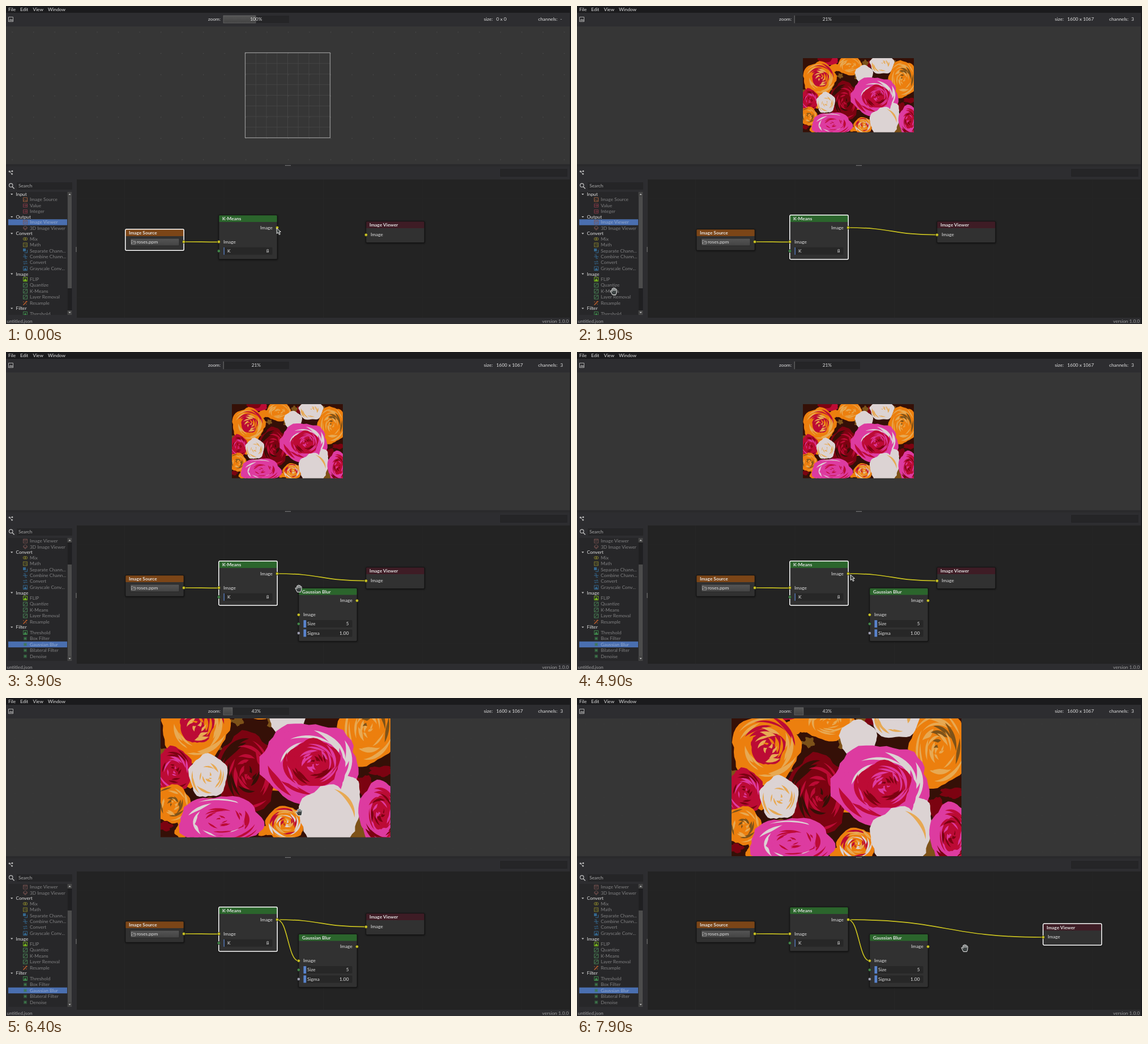
These frames come from a looping animation (998 by 561 pixels, 8000 ms). An HTML page:

```html
<!DOCTYPE html>
<html lang="en">
<head>
<meta charset="utf-8">
<title>Node editor</title>
<style>
html, body { margin: 0; width: 100%; height: 100%; overflow: hidden; background: #2d2d30; }
svg { display: block; width: 998px; height: 561px; font: 8.32px Lato, sans-serif; }
text { fill: #e2e2e2; white-space: pre; }
.bold { font-weight: 700; }
.dim { fill: #fff; fill-opacity: .42; }
</style>
</head>
<body>
<svg id="stage" viewBox="0 0 998 561"></svg>
<script>
const LOOP = 8000, STEP = 100;
const YELLOW = '#c9c224', GREEN = '#2b652c';
const $ = id => document.getElementById(id);

const rect = (x, y, w, h, fill, more = '') =>
  `<rect x="${x}" y="${y}" width="${w}" height="${h}" fill="${fill}" ${more}/>`;
const line = (d, stroke, width = 1, more = '') =>
  `<path d="${d}" fill="none" stroke="${stroke}" stroke-width="${width}" ${more}/>`;
const label = (x, y, str, cls = '', anchor = 'start', id = '') =>
  `<text x="${x}" y="${y + 2.9}" class="${cls}" text-anchor="${anchor}" id="${id}">${str}</text>`;
const dot = (x, y, r, fill, more = '') => `<circle cx="${x}" cy="${y}" r="${r}" fill="${fill}" ${more}/>`;

// ---------- flower picture, 406 x 271 units ----------
let seed = 11;
const rand = () => (seed = (seed * 16807) % 2147483647) / 2147483647;
const polygon = (pts, fill) =>
  `<path d="M${pts.map(p => p.map(v => v.toFixed(1)).join(' ')).join('L')}Z" fill="${fill}"/>`;

function blob(x, y, rx, ry, fill, wobble = .16) {
  const phase = rand() * 6, pts = [];
  for (let i = 0; i < 44; i++) {
    const a = i / 44 * Math.PI * 2;
    const r = 1 + wobble * (.35 * Math.sin(5 * a + phase) + .4 * (rand() - .5));
    pts.push([x + rx * r * Math.cos(a), y + ry * r * Math.sin(a)]);
  }
  return polygon(pts, fill);
}

function petal(x, y, rx, ry, r, start, span, thick, fill) {
  const outer = [], inner = [];
  for (let i = 0; i <= 12; i++) {
    const u = i / 12, a = start + span * u;
    const put = (list, k) => list.push([x + rx * k * Math.cos(a), y + ry * k * Math.sin(a)]);
    put(outer, r - .07 * u);
    put(inner, r - .07 * u - thick * Math.sin(Math.PI * u));
  }
  return polygon(outer.concat(inner.reverse()), fill);
}

function rose(x, y, rx, ry, base, tones, core) {
  let out = blob(x, y, rx, ry, base);
  if (core) out += blob(x + rx * .06, y, rx * .5, ry * .52, core);
  for (let r = .92, k = 0; r > .1; r -= .105, k++)
    for (let j = 0; j < 4; j++)
      out += petal(x + rx * .06 * (1 - r), y, rx, ry, r, j * 1.57 + k * .9 + rand(), .8 + rand() * .8,
        .06 + rand() * .09, tones[(j + k) % tones.length]);
  return out;
}

function flowers() {
  const dark = '#351007', wine = '#7c0311', red = '#bc0b35', pink = '#dd3ba0',
    orange = '#ec7f0e', sand = '#e7a953', olive = '#7d5219', white = '#dcd3d3';
  let out = rect(0, 0, 406, 271, dark);
  for (let i = 0; i < 46; i++)
    out += blob(rand() * 406, rand() * 271, 9 + rand() * 15, 7 + rand() * 13, [olive, dark, wine, olive, orange][i % 5], .5);
  out += blob(95, 8, 34, 18, red) + blob(80, 4, 26, 12, wine);
  out += rose(172, 28, 46, 34, orange, [sand, orange, sand]);
  out += blob(224, 58, 33, 32, white) + rose(290, 22, 44, 36, white, [white, sand, white, white]);
  out += rose(364, 76, 50, 68, orange, [sand, orange, sand, sand, olive]);
  out += rose(61, 74, 60, 60, orange, [sand, orange, sand, red], red);
  out += rose(22, 152, 34, 40, red, [wine, pink, red]);
  out += rose(152, 158, 54, 72, wine, [red, wine, dark, red]);
  out += rose(84, 163, 34, 38, white, [white, sand, white]);
  out += rose(20, 212, 32, 34, orange, [sand, orange, olive]);
  out += rose(220, 246, 34, 30, orange, [sand, white, red]);
  out += rose(262, 139, 86, 70, pink, [pink, red, pink, white, pink], red);
  out += rose(270, 140, 46, 42, red, [pink, wine, red, pink]);
  out += blob(298, 232, 54, 52, white) + blob(335, 195, 18, 32, white);
  out += petal(298, 232, 54, 52, .9, -1.4, 1.5, .12, sand);
  out += rose(106, 243, 74, 45, pink, [red, pink, white, pink], red);
  out += rose(104, 240, 42, 26, pink, [red, pink, pink]);
  out += rose(388, 228, 38, 56, pink, [red, wine, pink], red);
  return out;
}

// ---------- sidebar ----------
const icons = {
  pic: c => line('M30.5-3.5h7v7h-7zM31 2l2-2 2 2 1-1 1 1', c, .8),
  num: c => line('M30.5-3h7v6h-7zM32-1v2M34-1h1v2h-1zM36.5-1v2', c, .8),
  view: c => line('M30.5-3.5h7v7h-7zM30.5-1.8h7M32 1.5l1.5-2 2 2', c, .8),
  cube: c => line('M34-4l3 2v3l-3 2-3-2v-3zM30-1l4 2 4-2M34 1v3', c, .8),
  mix: c => dot(32.6, 0, 2.3, 'none', `stroke="${c}" stroke-width=".9"`) + dot(35.4, 0, 2.3, 'none', `stroke="${c}" stroke-width=".9"`),
  math: c => line('M30.5-3.5h7v7h-7zM32-1.5h1.8M34.8 1.5h1.8M35.5-2v2M32 2l2-2', c, .8),
  split: c => rect(30, -4, 5, 5, c) + line('M32.5 3.5h5v-5', c, 1),
  merge: c => line('M34-4v8M30 0h8M31-3h2M35 3h2', c, 1),
  swap: c => line('M30-1.5h7l-2-2M38 1.5h-7l2 2', c, .9),
  half: c => line('M30.5-3.5h7v7h-7z', c, .9) + polygon([[31, 3], [34, -2], [37, 3]], c),
  curve: c => line('M30.5-3.5h7v7h-7zM32 2.5q0-3 4.5-4.5', c, .9),
  wand: c => line('M30.5 3.5l5-5', c, 1.4) + line('M36-4v3M34.5-2.5h3.5M31-3v2M36 1v2', c, .8),
  blur: c => rect(31, -3, 6, 6, c, 'opacity=".45"') + dot(34, 0, 1.7, c)
};
const tree = [
  ['Input', ['Image Source', 'pic', '#b4683f'], ['Value', 'num', '#8f3b4b'], ['Integer', 'num', '#8f3b4b']],
  ['Output', ['Image Viewer', 'view', '#7c5552'], ['3D Image Viewer', 'cube', '#7c5552']],
  ['Convert', ['Mix', 'mix', '#8f8a2c'], ['Math', 'math', '#8f8a2c'], ['Separate Chann...', 'split', '#35688f'],
    ['Combine Chann...', 'merge', '#35688f'], ['Convert', 'swap', '#35688f'], ['Grayscale Conv...', 'half', '#35688f']],
  ['Image', ['FLIP', 'half', '#76b51c'], ['Quantize', 'curve', '#4c8a58'], ['K-Means', 'curve', '#4c8a58'],
    ['Layer Removal', 'curve', '#4c8a58'], ['Resample', 'wand', '#c8622c']],
  ['Filter', ['Threshold', 'half', '#3f8a4c'], ['Box Filter', 'blur', '#3f7a4c'], ['Gaussian Blur', 'blur', '#3f7a4c'],
    ['Bilateral Filter', 'blur', '#3f7a4c'], ['Denoise', 'blur', '#3f7a4c']]
];
const rowY = {};
function treeRows() {
  let y = 332, out = '';
  for (const [title, ...items] of tree) {
    out += polygon([[8, y - 1], [12.4, y - 1], [10.2, y + 1.4]], '#c8c8c8') + label(17.5, y, title);
    y += 9.6;
    for (const [name, icon, color] of items) {
      rowY[name] = y;
      out += `<g transform="translate(0 ${y})">${icons[icon](color)}</g>` + label(42, y - .2, name, 'dim');
      y += 10.45;
    }
    y -= 1.05;
  }
  return out;
}

// ---------- nodes ----------
const pin = (x, y, color = YELLOW) => dot(x, y, 2.7, color, 'stroke="#1c1c1c" stroke-width=".7"');
function node(x, y, h, title, color, selected, body) {
  return `<g transform="translate(${x} ${y})">` +
    rect(-.5, 0, 104.5, h + 1.5, '#000', 'rx="2" opacity=".55" filter="url(#shadow)"') +
    rect(0, 0, 103, h, '#313131', 'rx="1.5"') + rect(0, 0, 103, 12, color, 'rx="1.5"') +
    rect(-.2, -.2, 103.4, h + .4, 'none', `rx="2" stroke="${selected ? '#fff' : '#141414'}" stroke-width="${selected ? 1.5 : .9}"`) +
    label(6, 6.4, title, 'bold') + body + '</g>';
}
const slider = (y, name, value, fill, pinColor) =>
  rect(8.5, y - 6.5, 86, 13, '#272727', 'rx="1"') + rect(8.5, y - 6.5, fill, 13, '#5a84cc') +
  label(15, y - .2, name) + label(88.5, y - .2, value, '', 'end') + pin(0, y, pinColor);
const filterPorts = label(95, 22, 'Image', '', 'end') + pin(103, 22) + label(8, 46.7, 'Image') + pin(0, 47);

const sourceBody = rect(8.5, 16, 86.5, 13, 'url(#button)', 'rx="1" stroke="#222" stroke-width=".7"') +
  line('M10.5 19.5h2.5l1 1.3h3.5v5h-7zM10.5 25.5l1.6-3h6l-1.2 3', '#a8a8a8', .8) + label(20, 22.2, 'roses.ppm') + pin(103, 22);
const kmeansBody = filterPorts + slider(63.3, 'K', '8', 1.3, '#43884a');
const blurBody = filterPorts + slider(63, 'Size', '5', 4.8, '#43884a') + slider(79.3, 'Sigma', '1.00', 4.8, '#9d9db0');
const viewerBody = label(8, 23, 'Image') + pin(0, 23.7);

function wire(x1, y1, x2, y2) {
  const mid = (x1 + x2) / 2;
  return line(`M${x1} ${y1}C${mid} ${y1} ${mid} ${y2} ${x2} ${y2}`, '#191919', 2.8) +
    line(`M${x1} ${y1}C${mid} ${y1} ${mid} ${y2} ${x2} ${y2}`, YELLOW, 1.7);
}

// ---------- pointer ----------
const pointerShapes = {
  arrow: 'M0 0L.4 9.5 2.6 7.6 4.6 11.4 6.3 10.5 4.4 6.8 7.4 6.4Z',
  hand: 'M-2.5 6.5L-6-.2Q-5.6-2-4-.4L-3 .6-3.4-4Q-2.6-5.4-1.7-4L-1.2-5.4Q0-6.6.7-5.2L1.4-5.2Q2.7-5.8 3.1-4.2L3.3-3.4Q5-4 5.2-2.2L4.8 3 3.6 6.5ZM-1.5-4L-1-.5M.8-5L1-.7M3.2-3.6L2.9-.4',
  fist: 'M-2.8 5L-4.8 1-4.2-1-3-1.4-2.6-3.4Q-1.2-4.8-.4-3.6 1-4.8 1.9-3.4 3.8-4 4-2.2L4.9-1 4.4 2.8 3.4 5Z'
};
const path = [
  [0, 478, 392], [200, 478, 392], [700, 636, 403], [800, 636, 403], [1900, 65, 503], [2400, 68, 517],
  [3000, 68, 517], [3500, 495, 424], [3700, 517, 417], [3900, 517, 417], [4400, 489, 393], [4900, 483, 393],
  [5000, 480, 391], [5300, 517, 463], [5500, 517, 463], [6100, 518, 201], [6400, 518, 201], [6600, 513, 149],
  [7000, 512, 187], [7100, 513, 188], [7400, 680, 388], [7700, 867.5, 406.3], [7900, 685, 441]
];
function along(keys, t) {
  const i = keys.findIndex(k => k[0] > t);
  if (i < 0) return keys[keys.length - 1].slice(1);
  const a = keys[i - 1], b = keys[i], u = (t - a[0]) / (b[0] - a[0]), e = u * u * (3 - 2 * u);
  return a.slice(1).map((v, k) => v + (b[k + 1] - v) * e);
}
const within = (t, from, to) => t >= from && t < to;

function pointerKind(t) {
  if (t < 900 || within(t, 4500, 5400)) return 'arrow';
  return within(t, 3100, 3700) || within(t, 6600, 7200) || within(t, 7400, 7800) ? 'fist' : 'hand';
}

// ---------- scene ----------
$('stage').innerHTML = `<defs>
  <clipPath id="viewClip">${rect(0, 36, 996, 243, '#000')}</clipPath>
  <clipPath id="listClip">${rect(4, 328, 104, 217, '#000')}</clipPath>
  <clipPath id="photoClip">${rect(0, 0, 406, 271, '#000')}</clipPath>
  <filter id="shadow" x="-10%" y="-20%" width="120%" height="150%"><feGaussianBlur stdDeviation="1.6"/></filter>
  <linearGradient id="button" x2="0" y2="1"><stop stop-color="#555"/><stop offset="1" stop-color="#434343"/></linearGradient>
  <pattern id="dots" width="37.5" height="37.5" patternUnits="userSpaceOnUse">${rect(0, 0, 1.2, 1.2, '#fff', 'opacity=".13"')}</pattern>
  </defs>` +
  rect(0, 0, 998, 561, '#2d2d30') + rect(0, 0, 998, 12, '#1b1b1d') +
  [[4, 'File'], [25, 'Edit'], [47.5, 'View'], [74, 'Window']].map(([x, s]) => label(x, 5.6, s)).join('') +
  line('M4.5 19.5h8v8h-8zM6 25.5l2-2.5 1.5 1.5 1-1 1 2z', '#b8b8b8', .9) +
  label(357, 22.8, 'zoom:') + rect(384, 17, 116, 13, '#252527') +
  rect(384, 17, 1, 13, 'url(#button)', 'id="zoomFill" stroke="#777" stroke-width=".6"') +
  label(441.8, 22.8, '', '', 'middle', 'zoomText') +
  label(844, 22.8, 'size:') + label(866, 22.8, '', '', 'start', 'sizeText') +
  label(940, 22.8, 'channels:') + label(979, 22.8, '', '', 'start', 'channelText') +
  `<g clip-path="url(#viewClip)">${rect(0, 36, 998, 243, '#363636')}
    ${rect(0, 36, 998, 243, 'url(#dots)', 'id="dotLayer"')}
    <g id="emptyGrid">${[...Array(7)].map((_, i) => {
      const o = (i + 1) * 18.75;
      return line(`M${422.5 + o} 82.5v150M422.5 ${82.5 + o}h150`, '#484848', .8);
    }).join('')}${rect(422.5, 82.5, 150, 150, 'none', 'stroke="#999" stroke-width="1.2"')}</g>
    <g id="photo"><g clip-path="url(#photoClip)">${flowers()}</g></g></g>` +
  rect(0, 279, 998, 4, '#2a2a2c') + line('M493 281.3h10', '#8a8a8a', 1.2, 'stroke-dasharray="1.5 .6"') +
  line('M5.5 292h3.5M6 292l4 4M9.5 291.5l2-1', '#b8b8b8', .9) +
  dot(6, 292, 1.4, '#b8b8b8') + dot(11, 291.5, 1.4, '#b8b8b8') + dot(10.6, 296.3, 1.4, '#b8b8b8') +
  rect(873.5, 288, 117.5, 12.5, '#252527', 'stroke="#212123" stroke-width=".8"') +
  rect(125, 306, 873, 244, '#232323') +
  [209.5, 385, 560.5, 736, 911].map(x => line(`M${x} 306v244`, '#272727')).join('') +
  [340, 515].map(y => line(`M125 ${y}h873`, '#252525')).join('') +
  dot(8.7, 316.3, 3.2, 'none', 'stroke="#c4c4c4" stroke-width="1.1"') + line('M11 318.8l3.6 3.4', '#c4c4c4', 1.4) +
  rect(19, 311, 98, 13, '#252527') + `<g opacity=".7">${label(22, 317, 'Search')}</g>` +
  rect(4, 328, 104, 217, '#272729') +
  `<g clip-path="url(#listClip)"><g id="list">${rect(4, 0, 104, 10.4, '#4a6fb0', 'id="highlight"')}${treeRows()}</g></g>` +
  rect(108.5, 328, 8, 217, '#1f1f21') + rect(108.5, 328, 8, 8, '#444') + rect(108.5, 537, 8, 8, '#444') +
  polygon([[110.5, 333.3], [114.5, 333.3], [112.5, 331]], '#ccc') + polygon([[110.5, 539.7], [114.5, 539.7], [112.5, 542]], '#ccc') +
  rect(108.8, 336, 7.4, 162, '#4c4c4c', 'id="thumb"') + line('M124 425v9', '#777', 1.1) +
  '<g id="graph"></g>' +
  rect(0, 550, 998, 11, '#2d2d30') +
  `<g opacity=".62">${label(1.5, 555.6, 'untitled.json')}${label(994, 555.6, 'version 1.0.0', '', 'end')}</g>` +
  rect(996, 12, 2, 549, '#1a1a1c') +
  '<path id="pointer" fill="#3c4242" stroke="#ededed" stroke-width="1" stroke-linejoin="round"/>';

function draw(t) {
  const [px, py] = along(path, t);

  // viewer: wheel zoom about the pointer, then panning
  const loaded = t >= 900, info = t >= 1000;
  const zoom = t < 6200 ? 21 : t < 6300 ? 25 : t < 6400 ? 36 : 43;
  const scale = t < 6200 ? 1 : t < 6300 ? 1.2 : t < 6400 ? 1.728 : 2.0714;
  const [panX, panY] = along([[0, 0, 0], [6600, 0, 0], [7000, -1, 37], [7100, 0, 38.5]], t);
  const left = 518 - 119 * scale + panX + (scale > 2 ? 1.5 : 0), top = 201.5 - 109.5 * scale + panY;
  $('emptyGrid').style.display = loaded ? 'none' : '';
  $('photo').style.display = loaded ? '' : 'none';
  $('photo').setAttribute('transform', `translate(${left} ${top}) scale(${scale * 196 / 406})`);
  $('dotLayer').setAttribute('opacity', loaded ? (zoom > 40 ? .2 : 0) : 1);
  $('dots').setAttribute('patternTransform', loaded ? `translate(${left} ${top}) scale(.86)` : 'translate(10.5 45.5)');
  const shownZoom = info ? zoom : 100;
  $('zoomFill').setAttribute('width', Math.max(.4, 57 * (shownZoom - 21) / 79));
  $('zoomText').textContent = shownZoom + '%';
  $('sizeText').textContent = info ? '1600 x 1067' : '0 x 0';
  $('channelText').textContent = info ? '3' : '-';

  // sidebar
  const scroll = 48 * Math.min(1, Math.max(0, (t - 2000) / 300));
  $('list').setAttribute('transform', `translate(0 ${-scroll})`);
  $('thumb').setAttribute('y', 336 + scroll * .81);
  $('highlight').setAttribute('y', rowY[t < 3100 ? 'Image Viewer' : 'Gaussian Blur'] - 5.2);

  // graph
  const [vx, vy] = along([[0, 636, 380], [7400, 636, 380], [7700, 823.5, 398.3]], t);
  const hasBlur = t >= 3700;
  let out = wire(314, 416, 376, 416.4);
  if (t >= 700) out += wire(479, 391, vx, vy + 23.7);
  else if (t > 200) out += wire(479, 391, px, py);
  if (t >= 5300) out += wire(479, 391, 517, 463.7);
  else if (t > 5000) out += wire(479, 391, px, py);
  out += node(211, 394, 37, 'Image Source', '#7b4517', t < 200, sourceBody) +
    node(376, 369, 77.7, 'K-Means', GREEN, within(t, 200, 7400), kmeansBody) +
    node(vx, vy, 37.5, 'Image Viewer', '#3e1c25', t >= 7400, viewerBody);
  if (hasBlur) out += node(517, 416.6, 93.5, 'Gaussian Blur', GREEN, false, blurBody);
  $('graph').innerHTML = out;

  $('pointer').setAttribute('d', pointerShapes[pointerKind(t)]);
  $('pointer').setAttribute('transform', `translate(${px} ${py})`);
}

let begin = null, last = -1;
function tick(now) {
  begin ??= now;
  const t = Math.floor((now - begin) % LOOP / STEP) * STEP;
  if (t !== last) draw(last = t);
  requestAnimationFrame(tick);
}
draw(0);
requestAnimationFrame(tick);
</script>
</body>
</html>
```
